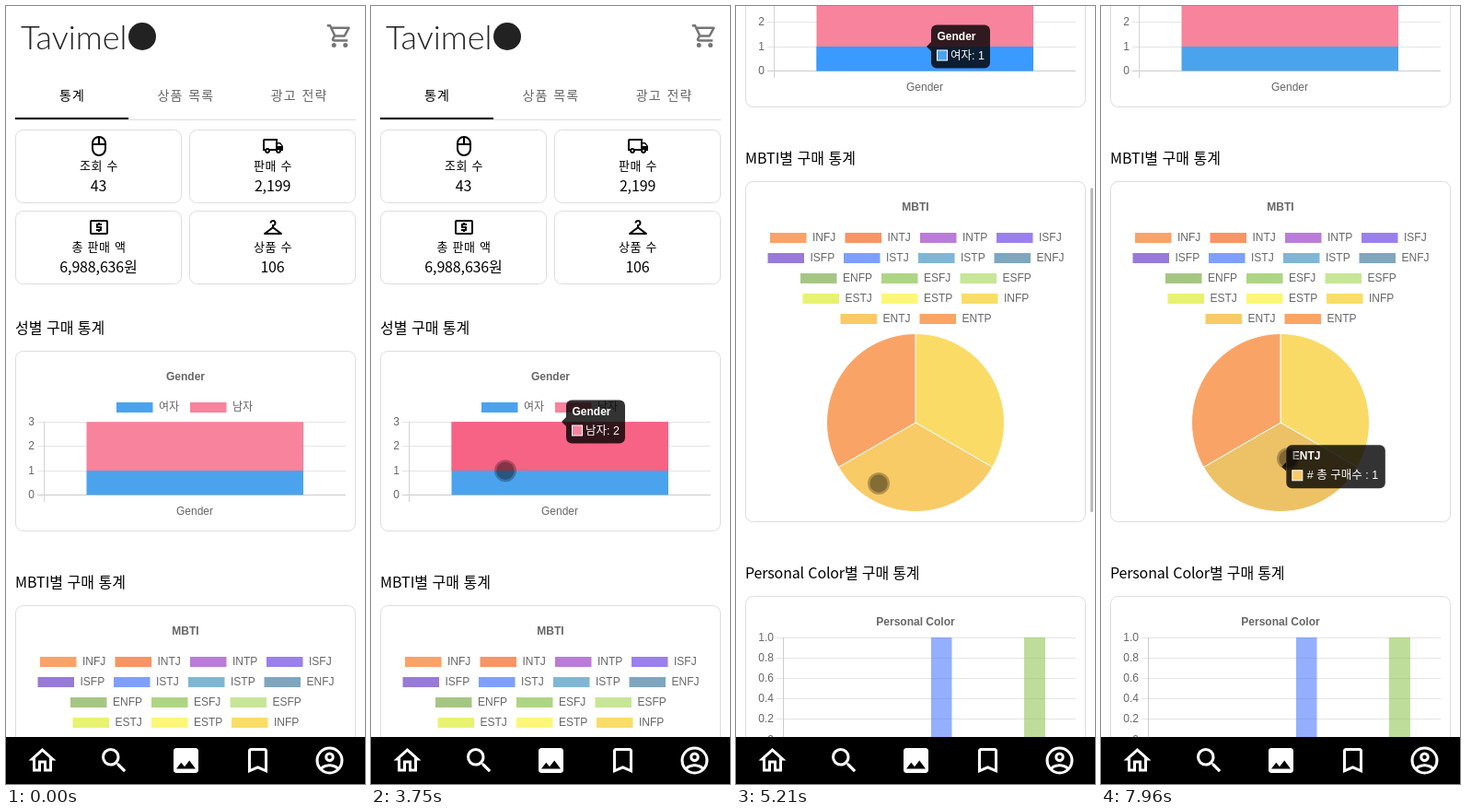
These frames come from a looping animation (390 px wide and 844 px high, 8 s). An HTML page:

```html
<!DOCTYPE html>
<html lang="ko">
<head>
<meta charset="utf-8">
<style>
html, body { margin: 0; width: 100%; height: 100%; overflow: hidden; background: #fff; }
svg { display: block; width: 390px; height: 844px; }
text { font-family: "Noto Sans CJK KR", "Noto Sans CJK", sans-serif; font-size: 16px; }
.tab { font-size: 14px; letter-spacing: 1.1px; word-spacing: .8px; }
.label { font-size: 13px; letter-spacing: .5px; word-spacing: .4px; }
.value { letter-spacing: -.15px; }
.chart, .bold, .tip { font: 12px "Liberation Sans", Arial, "Noto Sans CJK KR", sans-serif; fill: #666; }
.bold { font-weight: bold; }
.tip { font-size: 12.5px; }
.box .tip, .box .bold { fill: #fff; }
.logo { font: 300 36px Lato, sans-serif; fill: #222; }
.mid { text-anchor: middle; }
.end { text-anchor: end; }
</style>
</head>
<body>
<svg id="stage" viewBox="0 0 390 844"></svg>
<script>
const LOOP = 8000, STEP = 1000 / 15, FADE = 200, MOVE = 400;

// Icons on a 24 unit grid
const ICONS = {
  cart: 'M15.55 13c.75 0 1.41-.41 1.75-1.03l3.58-6.49c.37-.66-.11-1.48-.87-1.48H5.21l-.94-2H1v2h2l3.6 7.59-1.35 2.44C4.52 15.37 5.48 17 7 17h12v-2H7l1.1-2h7.45zM6.16 6h12.15l-2.76 5H8.53L6.16 6zM7 18a2 2 0 100 4 2 2 0 000-4zm10 0a2 2 0 100 4 2 2 0 000-4z',
  truck: 'M20 8h-3V4H3c-1.1 0-2 .9-2 2v11h2c0 1.66 1.34 3 3 3s3-1.34 3-3h6c0 1.66 1.34 3 3 3s3-1.34 3-3h2v-5l-3-4zm-.5 1.5l1.96 2.5H17V9.5h2.5zM6 18a1 1 0 110-2 1 1 0 010 2zm2.22-3c-.55-.61-1.33-1-2.22-1s-1.67.39-2.22 1H3V6h12v9H8.22zM18 18a1 1 0 110-2 1 1 0 010 2z',
  cash: 'M11 17h2v-1h1c.55 0 1-.45 1-1v-3c0-.55-.45-1-1-1h-3v-1h4V8h-2V7h-2v1h-1c-.55 0-1 .45-1 1v3c0 .55.45 1 1 1h3v1H9v2h2v1zm9-13H4c-1.11 0-1.99.89-1.99 2L2 18c0 1.11.89 2 2 2h16c1.11 0 2-.89 2-2V6c0-1.11-.89-2-2-2zm0 14H4V6h16v12z',
  hanger: 'M21.6 18.2L13 11.75v-.91c1.65-.49 2.8-2.17 2.43-4.05-.26-1.31-1.3-2.4-2.61-2.7C10.54 3.57 8.5 5.3 8.5 7.5h2c0-.83.67-1.5 1.5-1.5s1.5.67 1.5 1.5c0 .84-.69 1.52-1.53 1.5-.54-.01-.97.45-.97.99v1.76L2.4 18.2c-.77.58-.36 1.8.6 1.8h18c.96 0 1.37-1.22.6-1.8zM6 18l6-4.5 6 4.5H6z',
  home: 'M12 5.69l5 4.5V18h-2v-6H9v6H7v-7.81l5-4.5M12 3L2 12h3v8h6v-6h2v6h6v-8h3L12 3z',
  search: 'M15.5 14h-.79l-.28-.27C15.41 12.59 16 11.11 16 9.5a6.5 6.5 0 10-6.5 6.5c1.61 0 3.09-.59 4.23-1.57l.27.28v.79l5 4.99L20.49 19l-4.99-5zm-6 0a4.5 4.5 0 110-9 4.5 4.5 0 010 9z',
  photo: 'M21 19V5c0-1.1-.9-2-2-2H5c-1.1 0-2 .9-2 2v14c0 1.1.9 2 2 2h14c1.1 0 2-.9 2-2zM8.5 13.5l2.5 3.01L14.5 12l4.5 6H5l3.5-4.5z',
  bookmark: 'M17 3H7c-1.1 0-1.99.9-1.99 2L5 21l7-3 7 3V5c0-1.1-.9-2-2-2zm0 15l-5-2.18L7 18V5h10v13z',
  user: 'M12 2a10 10 0 100 20 10 10 0 000-20zM7.07 18.28c.43-.9 3.05-1.78 4.93-1.78s4.51.88 4.93 1.78C15.57 19.36 13.86 20 12 20s-3.57-.64-4.93-1.72zm11.29-1.45c-1.43-1.74-4.9-2.33-6.36-2.33s-4.93.59-6.36 2.33A8 8 0 1118.36 16.83zM12 6a3.5 3.5 0 100 7 3.5 3.5 0 000-7zm0 5a1.5 1.5 0 110-3 1.5 1.5 0 010 3z'
};
const MOUSE = 'M12 2a7 7 0 0 1 7 7v6a7 7 0 0 1-14 0V9a7 7 0 0 1 7-7zM12 2v8M5 10h14';

const text = (x, y, s, cls = '', fill = '#000') =>
  `<text x="${x}" y="${y}" class="${cls}" fill="${fill}">${s}</text>`;
const rect = (x, y, w, h, fill, more = '') =>
  `<rect x="${x}" y="${y}" width="${w}" height="${h}" fill="${fill}" ${more}/>`;
const line = (d, color = '#e5e5e5') => `<path d="${d}" stroke="${color}"/>`;
const card = (x, y, w, h) => rect(x + .5, y + .5, w - 1, h - 1, '#fff', 'rx="8" stroke="#ddd"');
const icon = (name, cx, cy, size = 24, color = '#000') => {
  const paint = ICONS[name] ? `fill="${color}"` : `fill="none" stroke="${color}" stroke-width="2"`;
  return `<path d="${ICONS[name] || MOUSE}" ${paint}
    transform="translate(${cx - size / 2} ${cy - size / 2}) scale(${size / 24})"/>`;
};
const stat = (x, y, name, label, value) => card(x, y, 181, 80) + icon(name, x + 91, y + 18) +
  text(x + 91, y + 44, label, 'label mid') + text(x + 90.5, y + 67, value, 'value mid');
const key = (x, y, color, name) => rect(x, y - 5, 39.5, 11, color) + text(x + 46, y + 4, name, 'chart');

// Hoverable shapes: base colour below, hover colour above
const BLUE = '#4ba3ee', PINK = '#f8839c';
const FILLS = {
  여자: [BLUE, '#3a9aff'], 남자: [PINK, '#f76385'],
  INFP: ['#fadb66', '#eed168'], ENTJ: ['#f9cb66', '#edc267'], ENTP: ['#f9a466', '#ea9f69']
};
const hoverable = (name, draw) => draw(FILLS[name][0]) + `<g id="${name}">${draw(FILLS[name][1])}</g>`;
const slice = (name, i) => {
  const r = 96.5, third = Math.PI * 2 / 3;
  const at = a => `${195 + r * Math.sin(a)} ${912 - r * Math.cos(a)}`;
  return hoverable(name, c => `<path d="M195 912L${at(i * third)}A${r} ${r} 0 0 1 ${at((i + 1) * third)}Z"
    fill="${c}" stroke="#fff"/>`);
};

const KEY_ROWS = [
  [[37, '#fba269', 'INFJ'], [118.5, '#f99464', 'INTJ'], [200, '#ba7dd7', 'INTP'], [283, '#9a80ee', 'ISFJ']],
  [[34.5, '#987ad8', 'ISFP'], [117, '#7ea0fd', 'ISTJ'], [198, '#7fb6d6', 'ISTP'], [280.5, '#7fa6bf', 'ENFJ']],
  [[70, '#a5c683', 'ENFP'], [158, '#aed584', 'ESFJ'], [243.5, '#c7e697', 'ESFP']],
  [[72.5, '#e8f270', 'ESTJ'], [158, '#fdf777', 'ESTP'], [245, '#fadd66', 'INFP']],
  [[113.5, '#faca66', 'ENTJ'], [199.5, '#faa466', 'ENTP']]
];

const header = text(16, 47, 'Tavimel', 'logo') + '<circle cx="148" cy="33" r="15" fill="#222"/>' +
  icon('cart', 362.5, 32.5, 30, '#757575') +
  ['통계', '상품 목록', '광고 전략'].map((s, i) =>
    text(72 + i * 123.3, 102, s, 'tab mid', i ? '#666' : '#000')).join('') +
  line('M10 123.5H380', '#ddd') + rect(10, 121, 123, 2, '#000') +
  stat(10, 134, 'mouse', '조회 수', '43') + stat(199, 134, 'truck', '판매 수', '2,199') +
  stat(10, 222, 'cash', '총 판매 액', '6,988,636원') + stat(199, 222, 'hanger', '상품 수', '106');

const gender = text(10, 355, '성별 구매 통계') + card(10, 374, 370, 196) +
  text(195, 406, 'Gender', 'bold mid') + key(120, 435, BLUE, '여자') + key(200, 435, PINK, '남자') +
  [3, 2, 1, 0].map((n, i) => {
    const y = Math.round(451 + i * 26.4);
    return line(`M34 ${y + .5}H369`, n ? '#e5e5e5' : '#ccc') + text(31, y + 4, n, 'chart end');
  }).join('') + line('M41.5 451V538', '#d4d4d4') + text(205, 552, 'Gender', 'chart mid') +
  hoverable('남자', c => rect(87.5, 451.2, 235.5, 52.8, c)) + hoverable('여자', c => rect(87.5, 504, 235.5, 26.4, c));

const mbti = text(10, 631, 'MBTI별 구매 통계') + card(10, 650, 370, 370) + text(195, 682, 'MBTI', 'bold mid') +
  KEY_ROWS.map((row, i) => row.map(([x, c, s]) => key(x, 711 + i * 22, c, s)).join('')).join('') +
  ['INFP', 'ENTJ', 'ENTP'].map(slice).join('');

const personal = text(10, 1081, 'Personal Color별 구매 통계', 'value') + card(10, 1100, 370, 300) +
  text(195, 1132, 'Personal Color', 'bold mid') +
  ['1.0', '0.8', '0.6', '0.4', '0.2', '0'].map((s, i) => {
    const y = Math.round(1145 + i * 22.1);
    return line(`M44 ${y + .5}H369`) + text(41, y + 4, s, 'chart end');
  }).join('') + line('M51.5 1145V1256', '#ccc') +
  rect(212, 1145, 22.5, 111, '#4f7bff', 'fill-opacity=".6"') +
  rect(313, 1145, 23, 111, '#93c658', 'fill-opacity=".6"');

const nav = rect(0, 793, 390, 51, '#000') +
  ['home', 'search', 'photo', 'bookmark', 'user'].map((n, i) => icon(n, 39.5 + i * 78, 818.5, 36, '#fff')).join('');

const stage = document.getElementById('stage');
stage.innerHTML = `<g id="page">${header + gender + mbti + personal}
    <g id="genderTip" class="box"></g><g id="mbtiTip" class="box"></g></g>
  ${rect(385, 0, 3, 352, '#bbb', 'id="bar" rx="1.5"')}${nav}
  <g id="cursor"><circle r="12" fill-opacity=".27"/><circle r="9.7" fill-opacity=".27"/></g>`;
const $ = id => document.getElementById(id);

// Tooltip stops: [time, name, left edge, centre y, caret on the right]
const TIPS = [
  { id: 'genderTip', width: 64, title: () => 'Gender', body: n => `${n}: ${n === '남자' ? 2 : 1}`, bodyX: 21,
    on: 2756, off: 5800, stops: [[0, '', 212, 504], [2756, '남자', 212, 451], [3755, '여자', 212, 504]] },
  { id: 'mbtiTip', width: 107.5, title: n => n, body: () => '# 총 구매수 : 1', bodyX: 22.5,
    on: 5755, off: LOOP * 2, stops: [[5690, 'ENTJ', 201.6, 960], [5735, 'ENTP', 160.4, 888],
      [6600, 'INFP', 122.1, 888, true], [7630, 'ENTJ', 201.6, 960]] }
];
// Pointer stops: [time, x, y]
const PATH = [
  [340, 150, 448], [540, 115, 250], [740, 135, 110], [940, 245, 165], [1130, 281, 178], [1145, 281, 178],
  [1470, 276, 268], [1675, 276, 268], [1940, 161, 243], [2145, 161, 243], [2756, 171, 452], [2866, 176, 472],
  [3000, 178, 478], [3010, 178, 478], [3755, 145, 505], [3950, 100, 510], [4220, 155, 518], [5680, 155, 518],
  [5740, 153, 477], [5933, 151, 444], [6200, 150, 430], [6230, 150, 430], [6600, 196, 424], [7000, 235, 430],
  [7040, 235, 430], [7630, 215, 464], [7866, 203, 491]
];

const clamp = v => Math.min(1, Math.max(0, v));
const mix = (a, b, p) => a + (b - a) * p;
const outQuart = v => 1 - (1 - clamp(v)) ** 4;
const smooth = v => { v = clamp(v); return v * v * (3 - 2 * v); };
const lastIndex = (list, t) => Math.max(0, list.findLastIndex(s => s[0] <= t));

function drawTip(tip, t) {
  const { id, stops, width, on, off } = tip, i = lastIndex(stops, t);
  const [start, name, x1, y1, right] = stops[i], [, , x0, y0] = stops[Math.max(0, i - 1)];
  const p = outQuart((t - start) / MOVE), alpha = clamp((t - on) / FADE) - clamp((t - off) / FADE);
  const node = $(id);
  node.setAttribute('opacity', alpha);
  node.setAttribute('transform', `translate(${mix(x0, x1, p)} ${mix(y0, y1, p) - 23.5})`);
  if (node.dataset.name !== name && name) {
    node.dataset.name = name;
    const caret = right ? `M${width} 18.5l5 5-5 5z` : 'M0 18.5l-5 5 5 5z';
    node.innerHTML = `<g opacity=".8">${rect(0, 0, width, 47, '#000', 'rx="6"')}<path d="${caret}"/></g>` +
      text(6.5, 16, tip.title(name), 'bold') + rect(6.5, 27.5, 11, 11, FILLS[name][0], 'stroke="#fff"') +
      text(tip.bodyX, 37, tip.body(name), 'tip');
  }
}

function hoverAmount(name, t) {
  let sum = 0;
  for (const { stops, off } of TIPS) stops.forEach(([start, n], i) => {
    const end = stops[i + 1] ? stops[i + 1][0] : off;
    if (n === name) sum += outQuart((t - start) / MOVE) - outQuart((t - end) / MOVE);
  });
  return clamp(sum);
}

function draw(now) {
  // The picture advances 15 times a second
  const t = Math.floor((now % LOOP + 5) / STEP) * STEP;
  const scroll = Math.round(230 * (smooth((t - 4411) / 270) + smooth((t - 4998) / 200)));
  $('page').setAttribute('transform', `translate(0 ${-scroll})`);
  $('bar').setAttribute('y', 4 + .42 * scroll);
  $('bar').setAttribute('opacity', t < 4411 ? 0 : 1 - clamp((t - 5440) / FADE));

  TIPS.forEach(tip => drawTip(tip, t));
  for (const name in FILLS) $(name).setAttribute('opacity', hoverAmount(name, t));

  const i = lastIndex(PATH, t), a = PATH[i], b = PATH[i + 1] || a;
  const p = clamp((t - a[0]) / (b[0] - a[0] || 1));
  $('cursor').setAttribute('transform', `translate(${mix(a[1], b[1], p)} ${mix(a[2], b[2], p)})`);
  $('cursor').setAttribute('opacity', t < 330 ? 0 : 1);
}

const begin = performance.now();
(function loop() {
  draw(performance.now() - begin);
  requestAnimationFrame(loop);
})();
</script>
</body>
</html>
```
